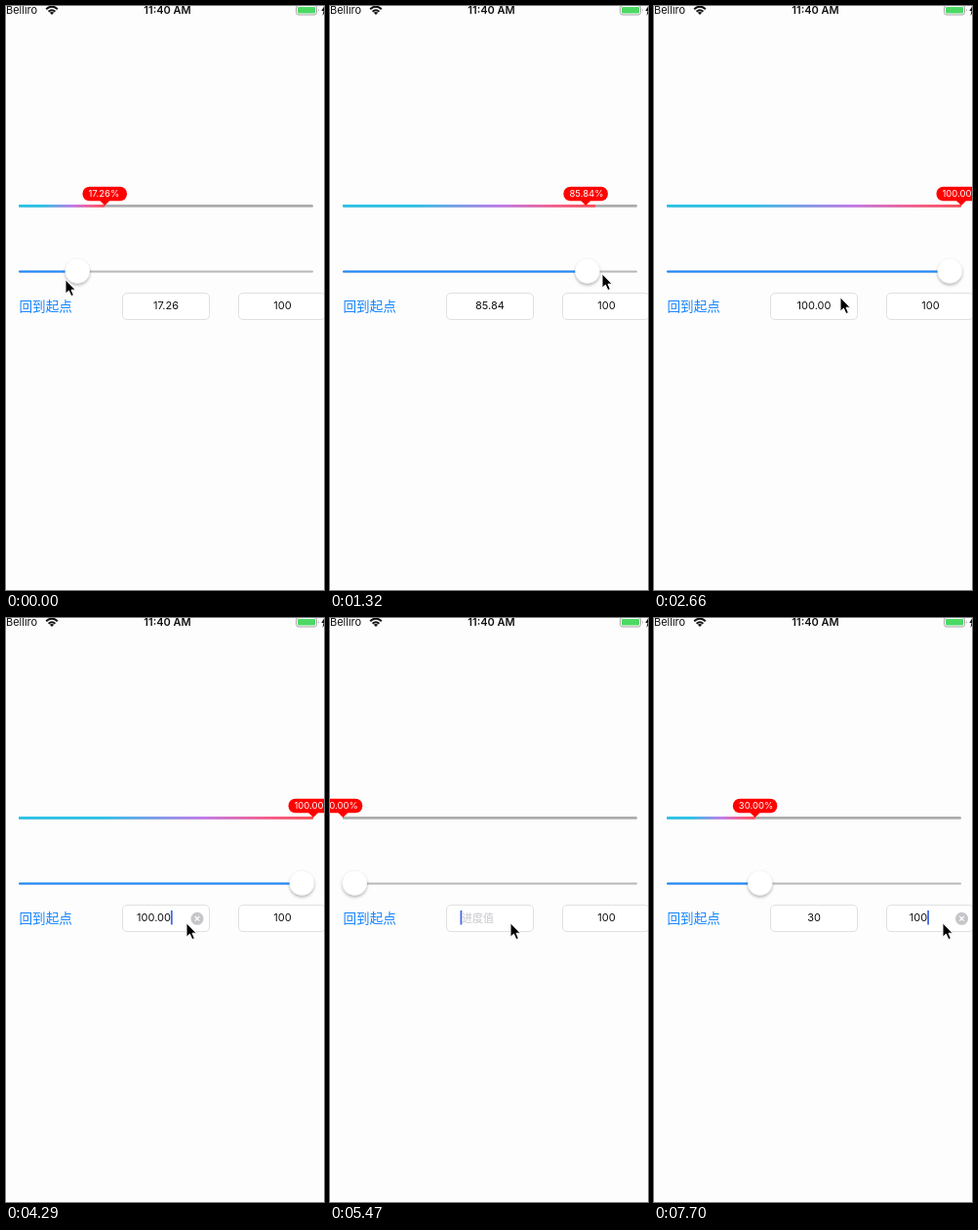
An HTML page that plays this animation: 326 px wide and 597 px high, repeating every 8 s.

```html
<!DOCTYPE html>
<html lang="zh">
<head>
<meta charset="utf-8">
<title>Progress slider</title>
<style>
html, body { margin: 0; width: 100%; height: 100%; overflow: hidden; background: #fdfdfd; }
svg { display: block; }
text { font-family: Inter, "Noto Sans CJK SC", "Noto Sans CJK", sans-serif; font-size: 11px; fill: #111; }
.cjk { font-family: "Noto Sans CJK SC", "Noto Sans CJK", sans-serif; }
.mid { text-anchor: middle; }
.field { fill: #fff; stroke: #e0e0e2; }
</style>
</head>
<body>
<svg width="326" height="597" viewBox="0 0 326 597">
  <defs>
    <linearGradient id="rainbow">
      <stop offset="0" stop-color="#2ac3e8"/>
      <stop offset=".28" stop-color="#2ac3e8"/>
      <stop offset=".62" stop-color="#c07aec"/>
      <stop offset=".84" stop-color="#f65c8c"/>
      <stop offset="1" stop-color="#ff4c54"/>
    </linearGradient>
    <filter id="shade" x="-40%" y="-40%" width="180%" height="200%">
      <feDropShadow dx="0" dy="2" stdDeviation="1.6" flood-color="#000" flood-opacity=".28"/>
    </filter>
    <g id="clear">
      <circle r="6.5" fill="#c6c6ca"/>
      <path d="M-2.3-2.3 2.3 2.3M2.3-2.3-2.3 2.3" stroke="#fff" stroke-width="1.2"/>
    </g>
  </defs>
  <rect width="326" height="597" fill="#fdfdfd"/>

  <!-- status bar -->
  <text x="0" y="8">Belliro</text>
  <g fill="none" stroke="#111" stroke-width="2">
    <path d="M41.2 3.2Q47-2 52.8 3.2M43.6 5.7Q47 2.8 50.4 5.7"/>
    <path d="M47 9 44.8 6.8Q47 5.2 49.2 6.8Z" fill="#111" stroke="none"/>
  </g>
  <text class="mid" x="165.500" y="8" font-weight="600">11:40 AM</text>
  <rect x="297.500" y="-.5" width="21" height="9.500" rx="2.500" fill="none" stroke="#a5a5a8"/>
  <rect x="299" y="1" width="18" height="6.500" rx="1" fill="#4cd964"/>
  <path d="M320 2.500Q321.800 4.300 320 6Z" fill="#a5a5a8"/>
  <path d="M327-1 323.300 5H325.500L324.500 10 329 3Z" fill="#111"/>

  <!-- progress line -->
  <rect x="13" y="203" width="302" height="2.800" rx="1.400" fill="#adadaf"/>
  <rect id="fill" x="13" y="203" height="2.800" rx="1" fill="url(#rainbow)"/>
  <g id="bubble">
    <rect id="pill" y="184.700" height="14.500" rx="7" fill="#f00"/>
    <path d="M-5 199H5L0 204Z" fill="#f00"/>
    <svg id="clip" y="184" height="16" overflow="hidden">
      <text id="label" y="11.400" style="font-size:9.500px;fill:#fff"></text>
    </svg>
  </g>

  <!-- slider -->
  <rect x="13" y="270.500" width="302" height="2" rx="1" fill="#b8b8ba"/>
  <rect id="track" x="13" y="270.500" height="2" rx="1" fill="#1a8aff"/>
  <circle id="thumb" cy="270.700" r="12.700" fill="#fff" stroke="#000" stroke-opacity=".07" stroke-width=".5" filter="url(#shade)"/>

  <text class="cjk" x="13.500" y="312" style="font-size:13.600px;fill:#1485ff">回到起点</text>
  <rect class="field" x="119.500" y="293.500" width="89" height="27" rx="4.500"/>
  <rect class="field" x="238.500" y="293.500" width="89" height="27" rx="4.500"/>
  <text id="hint" class="cjk" x="135" y="310.500" style="fill:#c7c7cd">进度值</text>
  <text id="text1" class="mid" y="310.300"></text>
  <text id="text2" class="mid" y="310.300">100</text>
  <use id="clear1" href="#clear" x="196" y="307.300"/>
  <use id="clear2" href="#clear" x="315.500" y="307.300"/>
  <rect id="caret" y="299" width="1.800" height="14.500" fill="#4668e8"/>
  <path id="cursor" d="M0 .7V15.200L3.400 12.100 5.900 17.600 8.400 16.500 6 11.200H10.300Z" fill="#000" stroke="#fff" stroke-width="1"/>
</svg>
<script>
const LOOP = 8000, STEP = 148, LEAD = 12;
const FOCUS = 22, ERASE = 31, RETYPE = 43, SWITCH = 52;
const $ = id => document.getElementById(id);
const put = (id, attrs) => {
  for (const name in attrs) $(id).setAttribute(name, attrs[name]);
};
const show = (id, on) => put(id, { visibility: on ? "visible" : "hidden" });

// Keys are [step, value, ...]
const drag = [[-1, 39], [0, 17.26], [2, 11.12], [9, 85.84], [12, 100]];
const pointer = [[0, 61, 279], [2, 50, 277], [9, 279, 273], [13, 325, 275], [18, 191, 297],
  [20, 185, 311], [46, 185, 311], [48, 249, 318], [50, 296, 311]];

// Eased position between the keys around step k
function glide(keys, k, col = 1) {
  const i = keys.findIndex(key => key[0] > k);
  if (i < 0) return keys[keys.length - 1][col];
  if (i === 0) return keys[0][col];
  const a = keys[i - 1], b = keys[i];
  const u = (k - a[0]) / (b[0] - a[0]);
  return a[col] + (b[col] - a[col]) * u * u * (3 - 2 * u);
}

function entryAt(k) {
  if (k < ERASE) return glide(drag, k).toFixed(2);
  if (k < RETYPE) return "100.00".slice(0, Math.max(0, ERASE + 5 - k));
  return "30".slice(0, k - RETYPE + 1);
}

const valueAt = k => Number(entryAt(k));
const labelAt = k => valueAt(k).toFixed(2) + "%";
const widthAt = k => 12.5 + 5.5 * labelAt(k).length;

// The bubble trails the value by a step or two
const trail = (fn, k) => 0.45 * fn(k) + 0.45 * fn(k - 1) + 0.1 * fn(k - 2);

function caretAlpha(k) {
  if (k < FOCUS) return 0;
  const phase = (k - FOCUS) % 7;
  return phase < 4 ? 1 : phase === 4 ? 0.45 : 0;
}

function drawFields(k) {
  const entry = entryAt(k);
  const second = k >= SWITCH, first = k >= FOCUS && !second;
  $("text1").textContent = entry;
  put("text1", { x: first ? 151.5 : 164 });
  put("text2", { x: second ? 271 : 283.5 });
  show("hint", !entry);
  show("clear1", first && entry);
  show("clear2", second);
  const active = $(second ? "text2" : "text1");
  const end = +active.getAttribute("x") + active.getComputedTextLength() / 2;
  put("caret", { x: entry ? end : 133.5, opacity: caretAlpha(k) });
}

function draw(time) {
  const k = Math.floor((time % LOOP + LEAD) / STEP);
  const value = valueAt(k), spot = trail(valueAt, k), wide = trail(widthAt, k);
  const knob = 25.3 + 2.78 * value;

  put("fill", { width: 3.02 * Math.max(value, spot) });
  put("bubble", { transform: `translate(${13 + 3.02 * spot} 0)` });
  put("pill", { x: -wide / 2, width: wide });
  put("clip", { x: 6 - wide / 2, width: wide - 11 });
  $("label").textContent = labelAt(k);

  put("track", { width: knob - 13 });
  put("thumb", { cx: knob });
  drawFields(k);
  put("cursor", { transform: `translate(${glide(pointer, k)} ${glide(pointer, k, 2)})` });
}

function tick() {
  draw(performance.now());
  requestAnimationFrame(tick);
}
tick();
</script>
</body>
</html>
```
